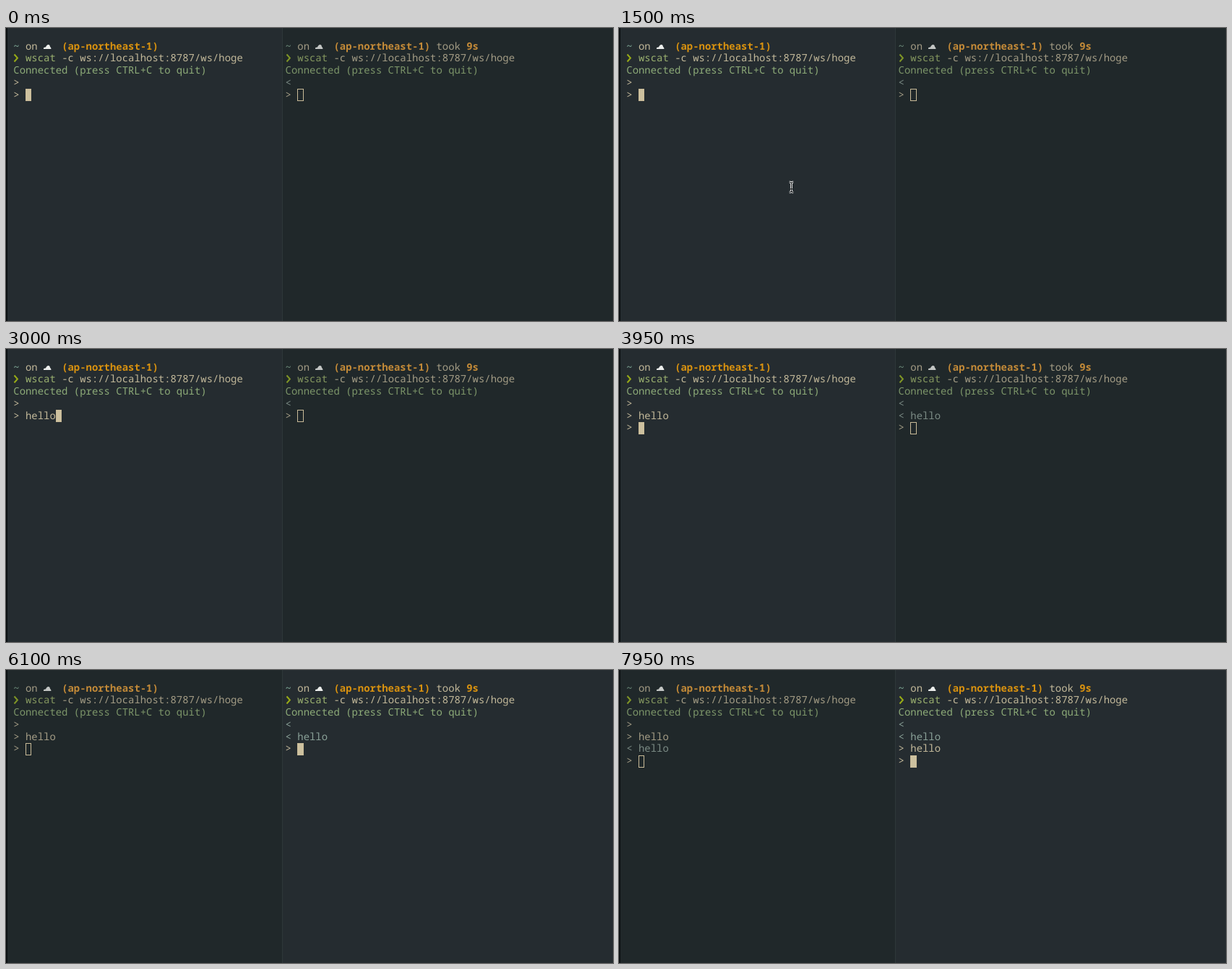
Write an HTML page that moves like this. It is 840 px wide and 405 px high and loops after 8 s.

```html
<!DOCTYPE html>
<html lang="en">
<head>
<meta charset="utf-8">
<title>Two terminals</title>
<style>
html, body { margin: 0; width: 100%; height: 100%; overflow: hidden; background: #0b0f11; }
#stage { position: relative; width: 840px; height: 405px; overflow: hidden; }
.pane {
  --fg: #a39c85; --green: #7c9569; --cmd: #84975f; --arrow: #7f9526;
  --orange: #c38a38; --tilde: #71917f; --in: #7b8b85; --cloud: #c3c6c4;
  position: absolute; top: 0; height: 405px; background: #20282a; color: var(--fg);
  font: 13.93px/16.8px "Noto Sans Mono", "DejaVu Sans Mono", monospace;
  text-rendering: geometricPrecision; font-variant-ligatures: none;
}
.pane.on {
  --fg: #c3b99a; --green: #8dab78; --cmd: #9ab06f; --arrow: #98ab16;
  --orange: #d9920f; --tilde: #84b09c; --in: #8aa198; --cloud: #eceeec;
  background: #252c30;
}
#left { left: 2px; width: 380px; --x: 8.3px; }
#right { left: 383px; width: 457px; --x: 3.6px; }
#divider { position: absolute; left: 382px; width: 1px; height: 405px; background: #2e3739; }
.lines { position: absolute; left: var(--x); top: 17.5px; white-space: pre; }
.lines div { height: 16.8px; }
.green { color: var(--green); }
.cmd { color: var(--cmd); }
.in { color: var(--in); }
.tilde { color: var(--tilde); }
.orange { color: var(--orange); font-weight: 600; }
.arrow { display: inline-block; width: 8.36px; height: 16.8px; vertical-align: top; }
.arrow path { fill: none; stroke: var(--arrow); stroke-width: 2; }
.cloud { position: absolute; left: 41.5px; top: 4px; fill: var(--cloud); }
.caret {
  position: absolute; box-sizing: border-box; width: 8.4px; height: 16.8px;
  border: 1.3px solid #c9bb98;
}
.on .caret { background: #cdc19f; }
#mouse { position: absolute; left: 0; top: 0; fill: none; }
</style>
</head>
<body>
<div id="stage">
  <div class="pane" id="left"></div>
  <div class="pane" id="right"></div>
  <div id="divider"></div>
  <svg id="mouse" width="12" height="20" viewBox="-6 -10 12 20">
    <defs><path id="beam" d="M-2.7-7Q0-7 0-5Q0-7 2.7-7M0-5V5M-2.7 7Q0 7 0 5Q0 7 2.7 7M-1.5 2.5H1.5"/></defs>
    <use href="#beam" stroke="#f2f2f2" stroke-width="3"/>
    <use href="#beam" stroke="#15191b" stroke-width="1.1"/>
  </svg>
</div>
<script>
const LOOP = 8000, CELL = 8.358, ROW = 16.8, WORD = "hello";
const FOCUS = 5700, SEND_LEFT = 3200, SEND_RIGHT = 7300;
const LEFT_KEYS = [1950, 2100, 2300, 2450, 2600];
const RIGHT_KEYS = [6350, 6500, 6650, 6800, 6950];
const $ = id => document.getElementById(id);
const span = (cls, text) => `<span class="${cls}">${text}</span>`;
const cloud = '<svg class="cloud" width="11" height="8"><path d="M0 7V5.6Q1 4.5 3 4.5Q4.3 1 6.6 1Q8.8 1 9 4Q10.4 4.7 10.5 7Z"/></svg>';
const arrow = '<svg class="arrow"><path d="M1.5 2.5L5.9 7.5L1.5 12.5"/></svg>';

const header = took => [
  span("tilde", "~") + " on    " + span("orange", "(ap-northeast-1)") +
    (took ? " took " + span("orange", took) : "") + cloud,
  arrow + " " + span("cmd", "wscat") + " -c ws://localhost:8787/ws/hoge",
  span("green", "Connected (press CTRL+C to quit)")
];
const sent = text => "&gt; " + text;
const received = text => span("in", "&lt; " + text);
const typed = (keys, t) => WORD.slice(0, keys.filter(k => t >= k).length);

const shown = {};
function drawPane(id, lines, input, focused) {
  const all = [...lines, sent(input)];
  const x = (2 + input.length) * CELL, y = (all.length - 1) * ROW - 0.5;
  const html = `<div class="lines">${all.map(l => `<div>${l}</div>`).join("")}` +
    `<i class="caret" style="left:${x}px;top:${y}px"></i></div>`;
  $(id).className = focused ? "pane on" : "pane";
  if (shown[id] !== html) $(id).innerHTML = shown[id] = html;
}

function drawMouse(t) {
  const p = Math.min(1, Math.max(0, (t - 50) / 700));
  const rest = (1 - p) ** 3;
  $("mouse").style.visibility = t >= 50 && t < LEFT_KEYS[0] ? "visible" : "hidden";
  $("mouse").style.transform = `translate(${232.5 + 60 * rest}px, ${210 + 138 * rest}px)`;
}

function draw(t) {
  const left = [...header(), sent("")];
  const right = [...header("9s"), received("")];
  if (t >= SEND_LEFT) {
    left.push(sent(WORD));
    right.push(received(WORD));
  }
  if (t >= SEND_RIGHT) {
    left.push(received(WORD));
    right.push(sent(WORD));
  }
  drawPane("left", left, t < SEND_LEFT ? typed(LEFT_KEYS, t) : "", t < FOCUS);
  drawPane("right", right, t < SEND_RIGHT ? typed(RIGHT_KEYS, t) : "", t >= FOCUS);
  drawMouse(t);
}

const start = performance.now();
function tick() {
  draw((performance.now() - start) % LOOP);
  requestAnimationFrame(tick);
}
tick();
</script>
</body>
</html>
```
